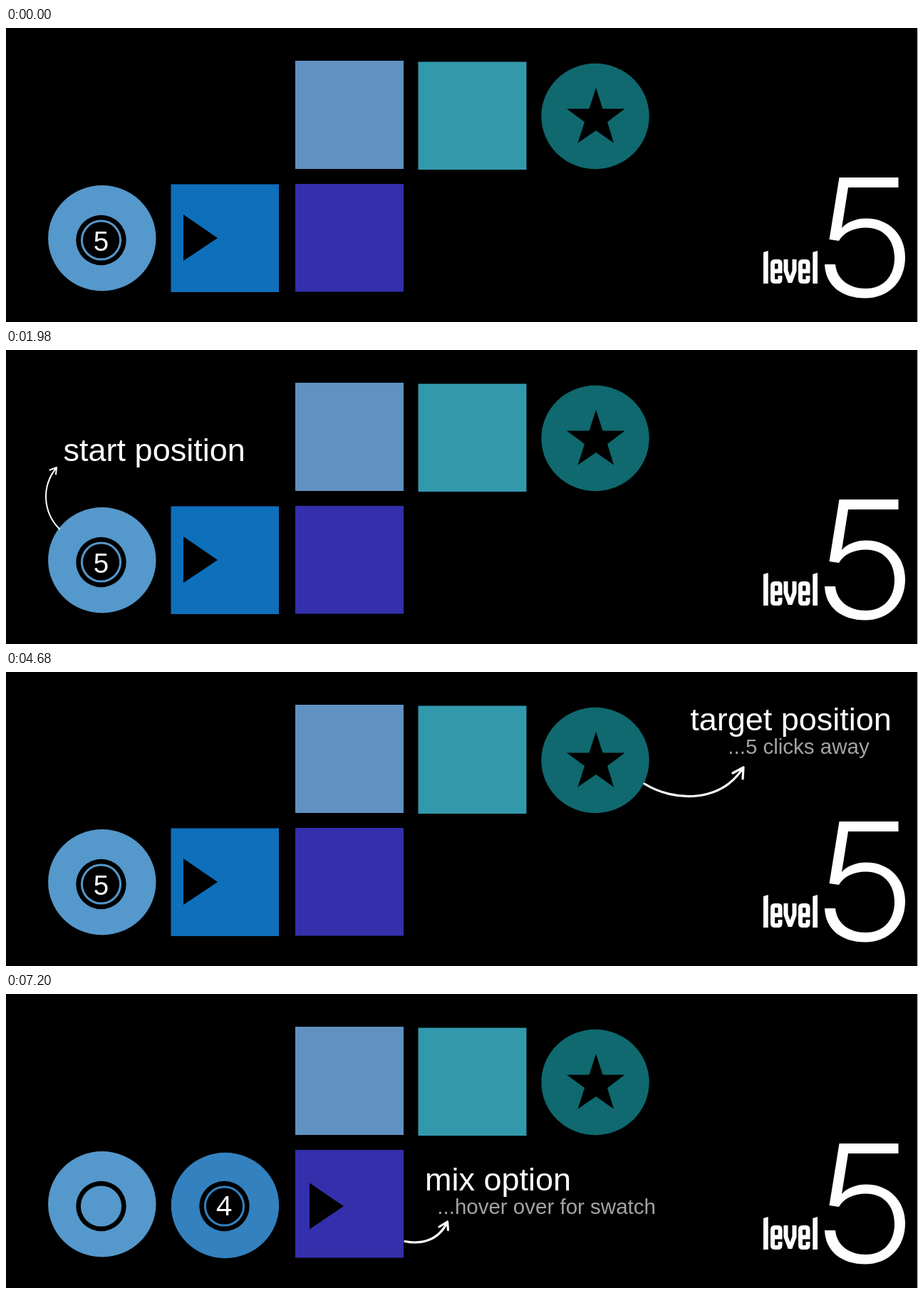
Animation, 1280 px wide and 413 px high, one loop 8 s. Source, as an HTML page:

```html
<!DOCTYPE html>
<html lang="en">
<head>
<meta charset="utf-8">
<title>Level 5</title>
<style>
  html, body { margin: 0; width: 100%; height: 100%; overflow: hidden; background: #000; }
  svg { display: block; width: 1280px; height: 413px; }
  text { font-family: "Liberation Sans", Arial, sans-serif; font-kerning: none; fill: #fff; }
  .head { font-size: 45px; }
  .sub { font-size: 29.5px; fill: #a3a3a3; }
  .digit { font-size: 38.5px; text-anchor: middle; }
  .four { font-family: "Noto Sans", "Open Sans", sans-serif; }
  .arrow { fill: none; stroke: #fff; stroke-width: 3.2; stroke-linecap: round; stroke-linejoin: round; }
  .thin { stroke-width: 2; }
  .letter { fill: none; stroke: #fff; stroke-width: 6; }
  .step { visibility: hidden; }
</style>
</head>
<body>
<svg viewBox="0 0 1280 413">
  <defs>
    <path id="e" class="letter" d="M3 341.5H13.5V331Q13.5 328 11 328H6Q3 328 3 331V353Q3 356 6 356H11Q13.5 356 13.5 353V348"/>
    <path id="l" fill="#fff" d="M0 315L6.7 313V359H0Z"/>
  </defs>
  <rect width="1280" height="413"/>
  <rect x="1279" width="1" height="413" fill="#ddd"/>

  <!-- board -->
  <rect x="406" y="46" width="152" height="152" fill="#6191c1"/>
  <rect x="578.5" y="47.5" width="152" height="151.5" fill="#3299ad"/>
  <rect x="406" y="219" width="152" height="151.5" fill="#3430ab"/>
  <ellipse cx="827" cy="124" rx="75.7" ry="74.2" fill="#0f696f"/>
  <path d="M828 84L837.5 113.5H868.5L844 132L853 161.5L828 144L802.5 161.5L812 132L787 113.5H818.5Z"/>
  <ellipse cx="134.8" cy="295.2" rx="75.7" ry="74.2" fill="#5598cb"/>
  <circle cx="133.5" cy="298" r="35.2"/>
  <circle cx="133.5" cy="298" r="28.6" fill="#5598cb"/>

  <!-- level badge -->
  <g role="img" aria-label="level 5">
    <use href="#l" x="1063"/>
    <use href="#e" x="1073"/>
    <path class="letter" d="M1094.5 325V341L1100.5 357L1106.5 341V325" stroke-linejoin="bevel"/>
    <use href="#e" x="1112"/>
    <use href="#l" x="1132.3"/>
    <path fill="#fff" d="M1169.5 210H1252.5V224H1182L1173 281C1181 272 1194 267.5 1207 267.5C1240 267.5 1262 291 1262 322C1262 356 1239 379.5 1206 379.5C1172 379.5 1150 361 1149 332H1164C1166 353 1183 366 1207 366C1231 366 1247 349 1247 323C1247 297 1231 280.5 1207 280.5C1190 280.5 1176 287 1169 299L1155.5 297Z"/>
  </g>

  <g class="step" data-from="0" data-to="6300">
    <circle cx="133.5" cy="298" r="25.6"/>
    <text class="digit" x="133.5" y="312.5">5</text>
    <rect x="231.5" y="219.5" width="151.5" height="151.5" fill="#0e6fbb"/>
    <path d="M249 262L297 295L249 327Z"/>
  </g>

  <g class="step" data-from="6300" data-to="8000">
    <ellipse cx="307.5" cy="297" rx="75.7" ry="74.2" fill="#3381bf"/>
    <circle cx="306.5" cy="298" r="35.2"/>
    <circle cx="306.5" cy="298" r="28.6" fill="#3381bf"/>
    <circle cx="306.5" cy="298" r="25.6"/>
    <text class="digit four" x="306" y="311">4</text>
    <path d="M426 265.5L474 298L426 330.5Z"/>
  </g>

  <g class="step" data-from="900" data-to="2700">
    <text class="head" x="80.6" y="156">start position</text>
    <path class="arrow thin" d="M75 251.5C52 228 49 192 71 165M61.5 168.5L71 165L70 174.5"/>
  </g>

  <g class="step" data-from="3600" data-to="5400">
    <text class="head" x="960.2" y="82">target position</text>
    <text class="sub" x="1013.3" y="114.5">...5 clicks away</text>
    <path class="arrow" d="M896 157C938 183 1003 184 1035 134M1020 142L1035 134L1034 150"/>
  </g>

  <g class="step" data-from="7200" data-to="8000">
    <text class="head" x="588" y="276">mix option</text>
    <text class="sub" x="605.3" y="308.5">...hover over for swatch</text>
    <path class="arrow" d="M560 347.5C582 352 607 347 619.5 320M608 327L619.5 320L620.5 331.5"/>
  </g>
</svg>
<script>
  const LOOP = 8000;
  const steps = [...document.querySelectorAll('.step')];
  const start = performance.now();

  function draw(now) {
    const t = Math.max(0, now - start) % LOOP;
    for (const el of steps) {
      const on = t >= +el.dataset.from && t < +el.dataset.to;
      el.style.visibility = on ? 'visible' : 'hidden';
    }
    requestAnimationFrame(draw);
  }
  draw(start);
</script>
</body>
</html>
```
